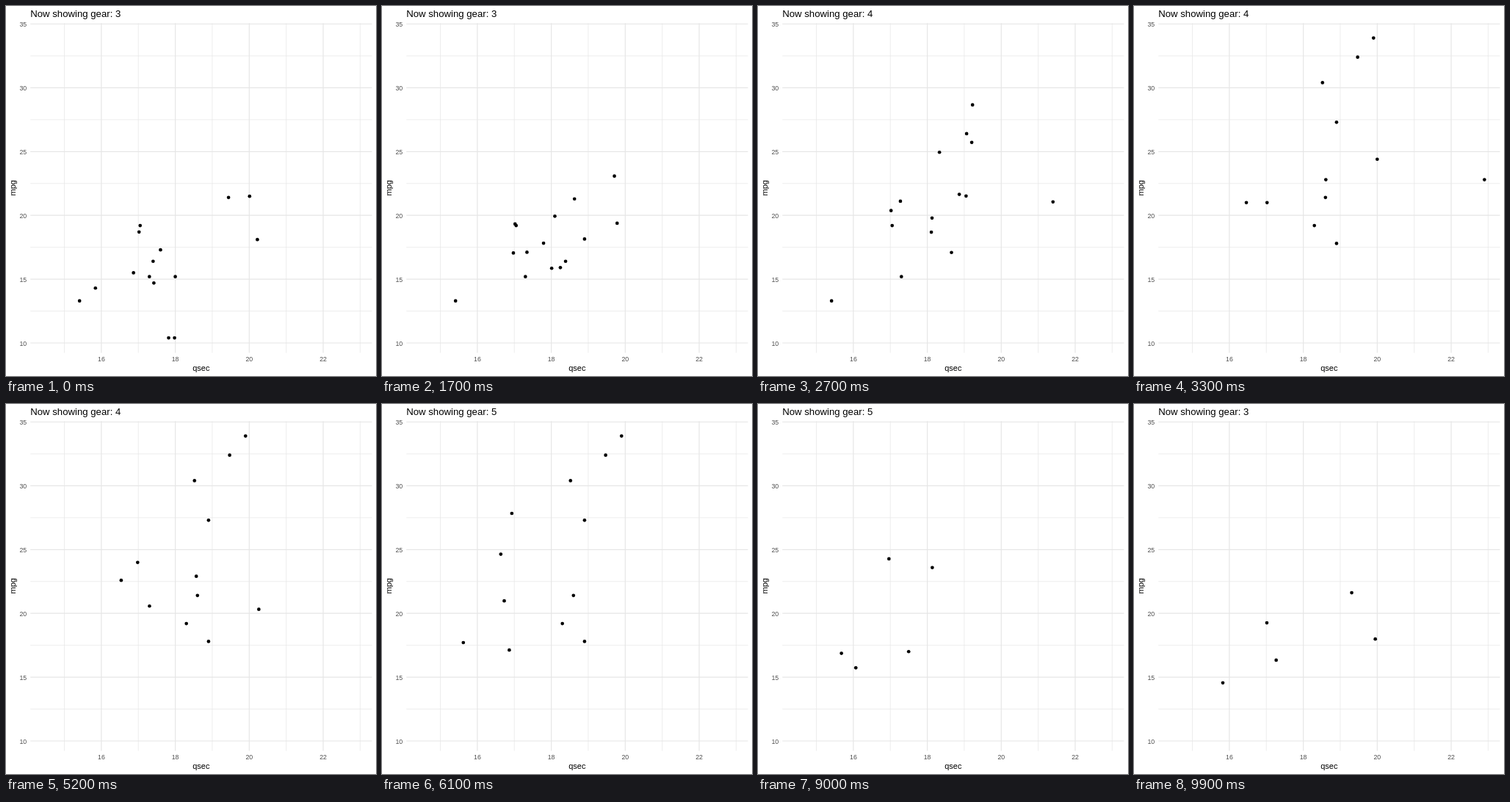
Write an HTML page with a canvas that moves like this. It is 504 by 504 pixels and loops after 10 s.

```html
<!DOCTYPE html>
<html lang="en">
<head>
<meta charset="utf-8">
<title>mpg by qsec</title>
<style>
html, body { margin: 0; width: 100%; height: 100%; overflow: hidden; background: #fff; }
canvas { display: block; }
</style>
</head>
<body>
<canvas id="plot" width="504" height="504"></canvas>
<script>
const ctx = document.getElementById('plot').getContext('2d');
const SIZE = 504, TICK = 100, FRAMES = 100;
const REST = 11, MOVE = 22;
const panel = { left: 33.19, right: 498.5, top: 23.2, bottom: 472.47 };
const midX = (panel.left + panel.right) / 2;
const midY = (panel.top + panel.bottom) / 2;

const scale = (lo, hi, a, b) => v => a + (v - lo) / (hi - lo) * (b - a);
const px = scale(14.08, 23.32, panel.left, panel.right);
const py = scale(9.225, 35.075, panel.bottom, panel.top);
const mix = (a, b, p) => a + (b - a) * p;

// resting [qsec, mpg] of the dots for gears 3, 4 and 5, paired by index
const gears = [
  [[19.44, 21.4], [17.02, 18.7], [20.22, 18.1], [15.84, 14.3], [17.4, 16.4],
   [17.6, 17.3], [18, 15.2], [17.98, 10.4], [17.82, 10.4], [17.42, 14.7],
   [20.01, 21.5], [16.87, 15.5], [17.3, 15.2], [15.41, 13.3], [17.05, 19.2]],
  [[16.46, 21], [17.02, 21], [18.61, 22.8], [20, 24.4], [22.9, 22.8], [18.3, 19.2],
   [18.9, 17.8], [19.47, 32.4], [18.52, 30.4], [19.9, 33.9], [18.9, 27.3], [18.6, 21.4]],
  [[16.7, 26], [16.9, 30.4], [14.5, 15.8], [15.5, 19.7], [14.6, 15]]
];

function range(from, to, step, fn) {
  for (let v = from; v <= to; v += step) fn(v);
}

function line(x1, y1, x2, y2) {
  ctx.beginPath();
  ctx.moveTo(x1, y1);
  ctx.lineTo(x2, y2);
  ctx.stroke();
}

function text(str, x, y, size, align, color) {
  ctx.font = size + 'px "Liberation Sans", Arial, sans-serif';
  ctx.textAlign = align;
  ctx.fillStyle = color;
  ctx.fillText(str, x, y);
}

function gridLines(firstQ, firstM, width) {
  ctx.lineWidth = width;
  range(firstM, 35, 5, m => line(panel.left, py(m), panel.right, py(m)));
  range(firstQ, 23, 2, q => line(px(q), panel.top, px(q), panel.bottom));
}

function labels(gear) {
  range(16, 22, 2, q => text(q, px(q), 483.8, 8.8, 'center', '#4d4d4d'));
  range(10, 35, 5, m => text(m, 28.24, py(m) + 3.8, 8.8, 'right', '#4d4d4d'));
  text('qsec', midX, 497, 11, 'center', '#000');
  ctx.save();
  ctx.translate(13.4, midY);
  ctx.rotate(-Math.PI / 2);
  text('mpg', 0, 0, 11, 'center', '#000');
  ctx.restore();
  text('Now showing gear: ' + gear, panel.left, 14.9, 13.2, 'left', '#000');
}

// each cycle moves to the next gear, then rests; the last move ends with the loop
function stateAt(frame) {
  const cycle = MOVE + REST + 1;
  const turn = Math.floor(Math.max(0, frame - REST) / cycle);
  const start = REST + turn * cycle;
  const p = Math.min(1, Math.max(0, frame - start) / Math.min(MOVE, FRAMES - start));
  const next = (turn + 1) % gears.length;
  const from = gears[turn], to = gears[next];
  const gear = 3 + (frame - start > MOVE / 2 ? next : turn);
  if (p === 1) return { gear, points: to };
  // leaving dots wait in place, entering ones appear on arrival
  const points = from.map((a, i) => a.map((v, k) => mix(v, (to[i] || a)[k], p)));
  return { gear, points };
}

function draw(frame) {
  const { gear, points } = stateAt(frame);
  ctx.fillStyle = '#fff';
  ctx.fillRect(0, 0, SIZE, SIZE);
  ctx.strokeStyle = '#e6e6e6';
  gridLines(15, 12.5, 0.7);
  gridLines(16, 10, 1.2);
  ctx.fillStyle = '#000';
  for (const [q, m] of points) {
    ctx.beginPath();
    ctx.arc(px(q), py(m), 2.35, 0, Math.PI * 2);
    ctx.fill();
  }
  labels(gear);
}

const begin = performance.now();
function loop() {
  const t = performance.now() - begin;
  draw(Math.floor(t / TICK) % FRAMES);
  requestAnimationFrame(loop);
}
loop();
</script>
</body>
</html>
```
